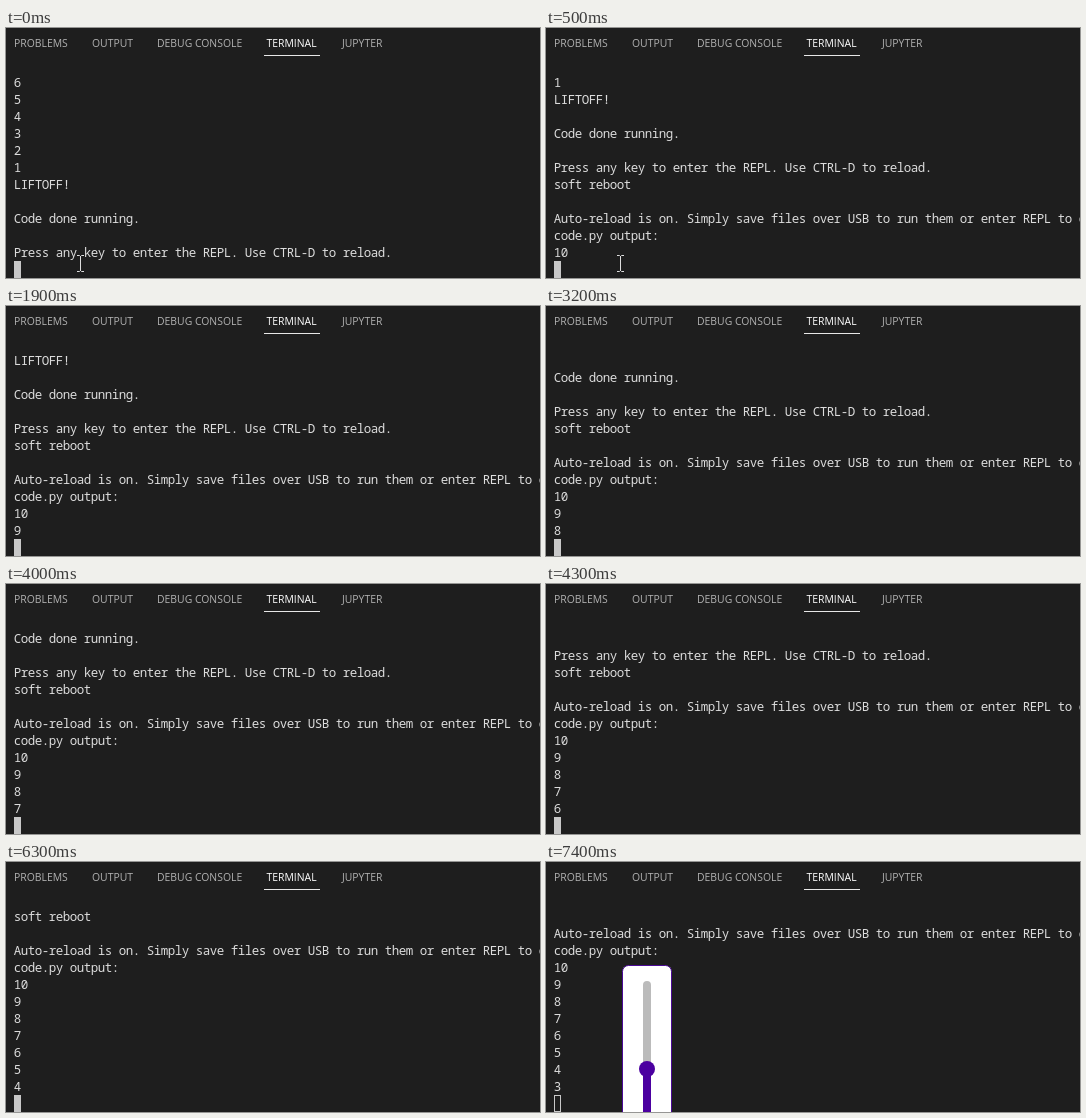
Recreate the animation shown at these times as an HTML page. Size 534 by 250 pixels, loop 8 s.

```html
<!DOCTYPE html>
<html lang="en">
<head>
<meta charset="utf-8">
<title>Countdown terminal</title>
<style>
  html, body { margin: 0; width: 100%; height: 100%; overflow: hidden; background: #1e1e1e; }
  svg { display: block; }
  #tabs { font: 10.4px "Open Sans", "Noto Sans", sans-serif; fill: #b2b2b2; }
  #tabs .active { fill: #fff; }
  #rows { font: 500 12.5px "Noto Sans Mono", "DejaVu Sans Mono", monospace; letter-spacing: -.5px; fill: #dcdcdc; }
</style>
</head>
<body>
<svg width="534" height="250" viewBox="0 0 534 250">
  <g id="tabs">
    <text x="8" y="19">PROBLEMS</text>
    <text x="86" y="19">OUTPUT</text>
    <text x="151" y="19">DEBUG CONSOLE</text>
    <text x="260.5" y="19" class="active">TERMINAL</text>
    <text x="336" y="19">JUPYTER</text>
  </g>
  <path d="M258 27.5H314" stroke="#e7e7e7"/>
  <g id="rows"></g>
  <rect id="block" x="8" y="233" width="7" height="17" fill="#c8c8c8"/>
  <rect id="hollow" x="8.5" y="233.5" width="6" height="16" fill="none" stroke="#c8c8c8"/>
  <path id="mouse" d="M71 227.5h2.5l1 1l1-1H78M74.5 228V243M71 243.5h2.5l1-1l1 1H78" fill="none" stroke="#ddd"/>
  <g id="slider">
    <rect x="76.5" y="103.5" width="49" height="160" rx="6" fill="#fff" stroke="#4b0a96"/>
    <path d="M101 123V207" stroke="#bbb" stroke-width="8" stroke-linecap="round"/>
    <path d="M101 207V250" stroke="#4b00a0" stroke-width="8"/>
    <circle cx="101" cy="207" r="8" fill="#4b00a0"/>
  </g>
</svg>
<script>
const LOOP = 8000, ROWS = 12, RESTART = 300, TICK = 1000;
const $ = id => document.getElementById(id);
const show = (id, on) => $(id).setAttribute('visibility', on ? 'visible' : 'hidden');

const before = ['6', '5', '4', '3', '2', '1', 'LIFTOFF!', '', 'Code done running.', '',
  'Press any key to enter the REPL. Use CTRL-D to reload.'];
const after = ['soft reboot', '',
  'Auto-reload is on. Simply save files over USB to run them or enter REPL to disable.',
  'code.py output:'];

const rows = Array.from({ length: ROWS }, (_, i) => {
  const row = document.createElementNS('http://www.w3.org/2000/svg', 'text');
  row.setAttribute('x', 7.8);
  row.setAttribute('y', 59 + 17 * i);
  return $('rows').appendChild(row);
});

// Everything printed by time t, one more number each second after the restart
function output(t) {
  if (t < RESTART) return before;
  const count = Math.floor((t - RESTART) / TICK) + 1;
  const numbers = Array.from({ length: count }, (_, i) => String(10 - i));
  return [...before, ...after, ...numbers];
}

function draw(t) {
  const lines = output(t).slice(1 - ROWS);
  rows.forEach((row, i) => {
    const text = lines[i] || '';
    if (row.textContent !== text) row.textContent = text;
  });
  const focused = t < 6900;
  show('block', focused);
  show('hollow', !focused);
  show('mouse', t < 700);
  show('slider', t >= 7400);
}

const start = performance.now();
function frame() {
  draw((performance.now() - start) % LOOP);
  requestAnimationFrame(frame);
}
frame();
</script>
</body>
</html>
```
